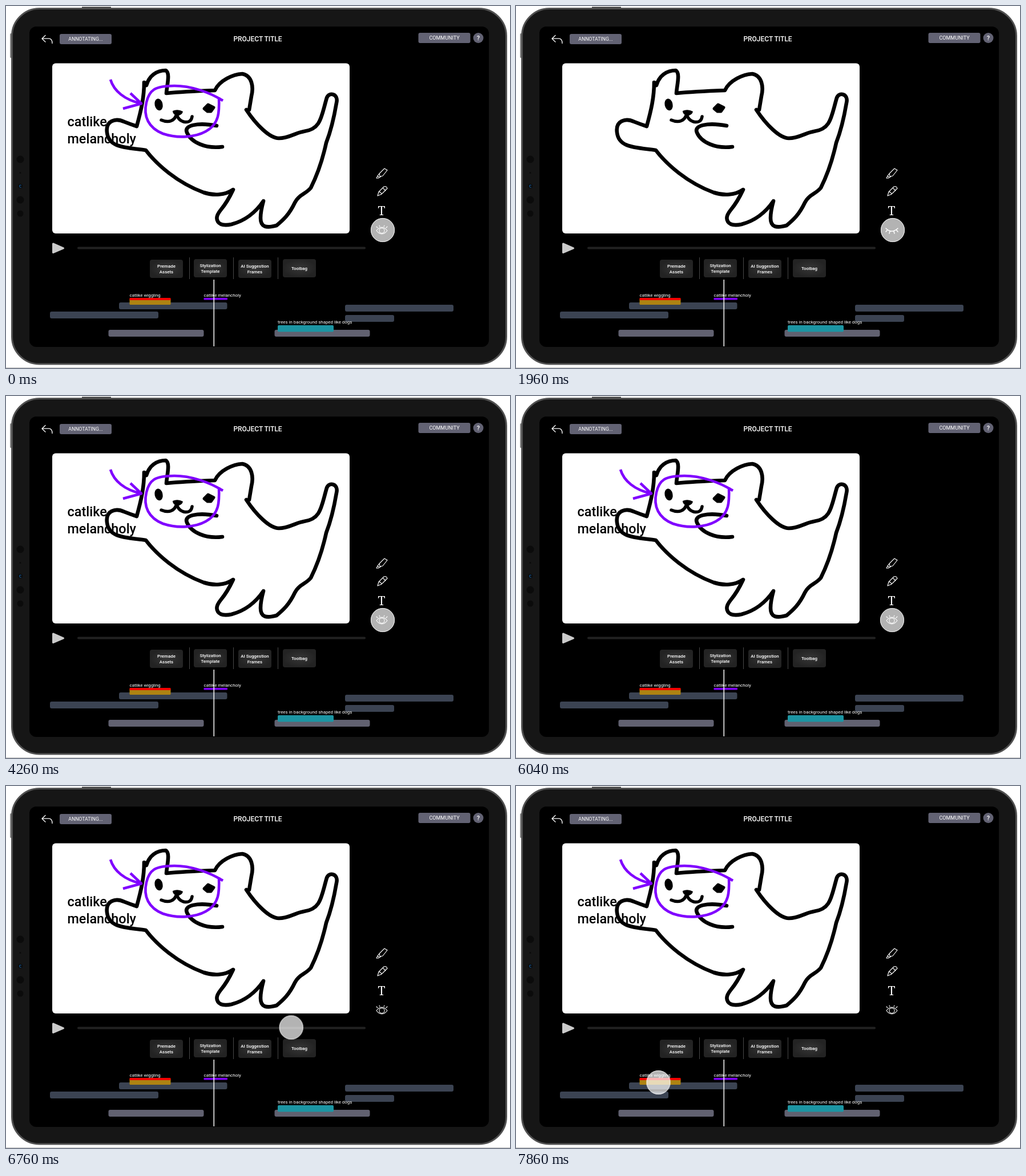
An HTML page that plays this animation: 883x635 px, repeating every 8 s.

```html
<!DOCTYPE html>
<html lang="en">
<head>
<meta charset="utf-8">
<title>Annotation tool</title>
<style>
  html, body { margin: 0; width: 100%; height: 100%; overflow: hidden; background: #fff; }
  svg { display: block; width: 883px; height: 635px; }
  text { font-family: Roboto, "Open Sans", sans-serif; fill: #fff; }
  .label { font-size: 7.9px; }
  .tool { font-size: 7.9px; font-weight: 500; text-anchor: middle; }
  .caps { text-anchor: middle; }
  .line { fill: none; stroke-linecap: round; stroke-linejoin: round; }
  .cat { stroke: #000; stroke-width: 6.6; }
  .mark { stroke: #8000ff; stroke-width: 4.6; stroke-linecap: butt; }
  .icon { stroke: #fff; stroke-width: 1.1; }
  .note { font-size: 23.4px; font-weight: 500; fill: #000; }
  .slot { fill: #3b4352; }
  .track { fill: #616170; }
  .pill { fill: #626273; }
</style>
</head>
<body>
<svg viewBox="0 0 883 635">
  <defs>
    <radialGradient id="key"><stop offset="0" stop-color="#363636"/><stop offset="1" stop-color="#232323"/></radialGradient>
  </defs>

  <!-- tablet -->
  <rect width="883" height="635" fill="#fff"/>
  <path d="M0 634.5H883" stroke="#c4c4c4"/>
  <path d="M133 2.5H184" stroke="#333" stroke-width="2"/>
  <rect x="7" y="48" width="5" height="43" rx="1.5" fill="#8b8b8b"/>
  <rect x="10.5" y="4.5" width="866" height="623.5" rx="48" fill="#161616" stroke="#515151" stroke-width="3"/>
  <rect x="41" y="36" width="805" height="562" rx="12" fill="#000"/>
  <g fill="#0b0b0b">
    <circle cx="25" cy="269" r="6.5"/><circle cx="25" cy="292.5" r="1.5"/>
    <circle cx="25" cy="316" r="4"/><circle cx="25" cy="340" r="6.5"/><circle cx="25" cy="364" r="5.5"/>
  </g>
  <path class="line" d="M26.5 314.5Q23.5 313.5 23.5 316T26.5 318" stroke="#14508a" stroke-width="1.2"/>

  <!-- header -->
  <path class="line" d="M69 51.500L63 57.200L69 63M63 57.200H75Q81 57.200 81 65.500" stroke="#fff" stroke-width="1.3"/>
  <rect class="pill" x="94" y="49" width="91" height="18" rx="3"/>
  <text class="caps" x="139.500" y="61" font-size="8.700">ANNOTATING...</text>
  <text class="caps" x="441" y="62" font-size="12" font-weight="500">PROJECT TITLE</text>
  <rect class="pill" x="722.500" y="47" width="91" height="18" rx="3"/>
  <text class="caps" x="768" y="59" font-size="9">COMMUNITY</text>
  <circle class="pill" cx="827.500" cy="56" r="9"/>
  <text class="caps" x="827.500" y="60" font-size="11" font-weight="500">?</text>

  <!-- canvas -->
  <rect x="81" y="100.500" width="521" height="298.500" rx="6" fill="#fff"/>
  <g class="line cat">
    <path d="M246 139C251 122 264 113 280 113C288 118 282 138 281 153C310 150 338 149 366 148
      C374 130 398 120 414 119C431 122 434 142 430 158Q428 170 426 182
      M421 182C438 208 462 232 478 232C496 232 505 223 522 220C552 216 552 195 562 161
      C566 150 583 154 579 170C574 200 568 222 561 240C553 277 542 303 534 319
      C525 330 513 331 506 345C496 366 486 375 474 385C456 390 446 388 446 372Q446 360 451 342
      C434 367 414 378 395 383C370 388 363 374 376 358C386 346 392 335 398 322
      C384 332 364 333 346 327C300 310 264 278 245 253C210 248 180 249 177 222
      C174 201 192 196 207 203Q217 207 229 211C237 182 242 160 242 134"/>
    <path d="M369 210C336 204 311 209 317 222C324 239 350 251 379 247"/>
    <path stroke-width="5.500" d="M272 200C286 206 296 201 299 189Q301 200 311 203Q324 206 326 194"/>
  </g>
  <ellipse cx="267.500" cy="173" rx="7" ry="10.500" transform="rotate(-12 267 173)"/>
  <path d="M292 184Q301 180 310 185Q309 191 300 193Q291 189 292 184Z"/>
  <path class="line" d="M347 180L354 173L364 178L359 185L353 185Z" fill="#000" style="fill:#000" stroke="#000" stroke-width="5"/>

  <g id="notes">
    <g class="line mark">
      <path d="M380 166C356 151 324 140 295 140C260 140 251 148 246 169C240 194 250 214 275 224
        C302 233 332 230 350 220C374 207 374 185 373 160"/>
      <path d="M183 129C189 149 208 165 237 171L218 153M205 180L238 171"/>
    </g>
    <text class="note" x="107.500" y="210.500">catlike</text>
    <text class="note" x="107.500" y="241">melancholy</text>
  </g>

  <!-- side tools -->
  <g class="line icon">
    <path d="M654 294L663 285L668 288L660 298L655 299ZM654 294L651 298L654 301L657 299M651 298L649 302H653"/>
    <path d="M651 333L653 326L662 317Q666 315 668 320L658 330ZM653 326Q657 326 658 330M660 319L665 324"/>
    <g id="open">
      <path d="M649 394Q658.500 382 668 394Q658.500 406 649 394Z"/>
      <circle cx="658.500" cy="394" r="4.600"/>
      <path d="M651 389L649 387M655 387L654 385M662 387L663 385M666 389L668 387"/>
    </g>
    <path id="shut" stroke-width="1.500" d="M648 390Q658 400 669 390M650.500 393L648 396M655 395.500L654 399M662 395.500L663 399M666.500 393L669 396"/>
  </g>
  <text x="658" y="366.500" font-size="21" text-anchor="middle" style="font-family:'Noto Serif','Liberation Serif',serif">T</text>

  <!-- player -->
  <path class="line" d="M82.500 417L100.500 424.800L82.500 432.500Z" style="fill:#ccc" stroke="#ccc" stroke-width="3"/>
  <rect x="125" y="422.500" width="505" height="4" rx="2" fill="#222"/>
  <path d="M321.500 441V479M398.500 441V479M476.500 441V479" stroke="#484848"/>
  <g id="keys"></g>

  <!-- timeline -->
  <g class="slot">
    <rect x="198" y="520" width="189.500" height="12" rx="3"/>
    <rect x="77" y="536" width="190" height="12" rx="3"/>
    <rect x="594" y="524" width="190" height="12" rx="3"/>
    <rect x="594" y="542" width="86" height="12" rx="3"/>
  </g>
  <g class="track">
    <rect x="179.500" y="568" width="167" height="12" rx="3"/>
    <rect x="470.500" y="568" width="167" height="12" rx="3"/>
  </g>
  <rect x="216.500" y="513" width="72" height="11" rx="1.500" fill="#ae8312"/>
  <rect x="216.500" y="512" width="72" height="4" rx="1" fill="#f20000"/>
  <rect x="346.500" y="512" width="41.500" height="3.500" rx="1" fill="#8000ff"/>
  <rect x="476" y="560" width="98" height="11.500" rx="2" fill="#1c95a3"/>
  <text class="label" x="216.500" y="509.500">catlike wiggling</text>
  <text class="label" x="346.500" y="509.500">catlike melancholy</text>
  <text class="label" x="476" y="557">trees in background shaped like dogs</text>
  <path d="M364.300 480V597" stroke="#fff" stroke-width="1.500"/>

  <g id="cursor">
    <circle id="touch" r="21" fill="#fff"/>
    <circle r="20.600" fill="none" stroke="#fff" stroke-opacity=".85"/>
  </g>
</svg>
<script>
const LOOP = 8000;
const byId = id => document.getElementById(id);

// steps: [ms, value] pairs, spread over one loop
function play(id, prop, steps, easing = 'linear') {
  const full = [[0, steps[0][1]], ...steps, [LOOP, steps.at(-1)[1]]];
  const frames = full.map(([ms, value]) => ({ offset: ms / LOOP, [prop]: value, easing }));
  byId(id).animate(frames, { duration: LOOP, iterations: Infinity });
}

const keys = [
  [252, 445, 'Premade', 'Assets'],
  [329, 444, 'Stylization', 'Template'],
  [407, 445, 'AI Suggestion', 'Frames'],
  [485, 444, 'Toolbag'],
];
byId('keys').innerHTML = keys.map(([x, y, ...lines]) =>
  `<rect x="${x}" y="${y}" width="58" height="32" rx="4" fill="url(#key)"/>` +
  lines.map((line, i) =>
    `<text class="tool" x="${x + 29}" y="${y + (lines.length > 1 ? 14 + i * 10 : 19)}">${line}</text>`).join('')
).join('');

// layers are hidden and shown again by the eye button
const HIDE = 1960, SHOW = 3970;
const toggle = (id, a, b) => play(id, 'opacity', [[HIDE, a], [HIDE, b], [SHOW, b], [SHOW, a]], 'step-end');
toggle('notes', 1, 0);
toggle('open', 1, 0);
toggle('shut', 0, 1);

const IDLE = 0.7, PRESSED = 0.4;
const press = ms => [[ms, IDLE], [ms, PRESSED], [ms + 120, PRESSED], [ms + 140, IDLE]];
play('touch', 'fillOpacity', [1680, 3690, 7720].flatMap(press));

const path = [
  [6020, 660, 393], [6040, 659, 393], [6400, 655, 393.5], [6560, 630, 397], [6680, 570, 407.5],
  [6720, 538, 414], [6760, 501, 423], [6780, 474, 433], [6870, 474, 433], [6880, 448, 443],
  [7000, 362, 480], [7080, 330, 493], [7160, 310.5, 501.5], [7300, 281, 511], [7450, 260, 517], [7620, 249.5, 520],
];
play('cursor', 'transform', path.map(([ms, x, y]) => [ms, `translate(${x}px, ${y}px)`]));
</script>
</body>
</html>
```
